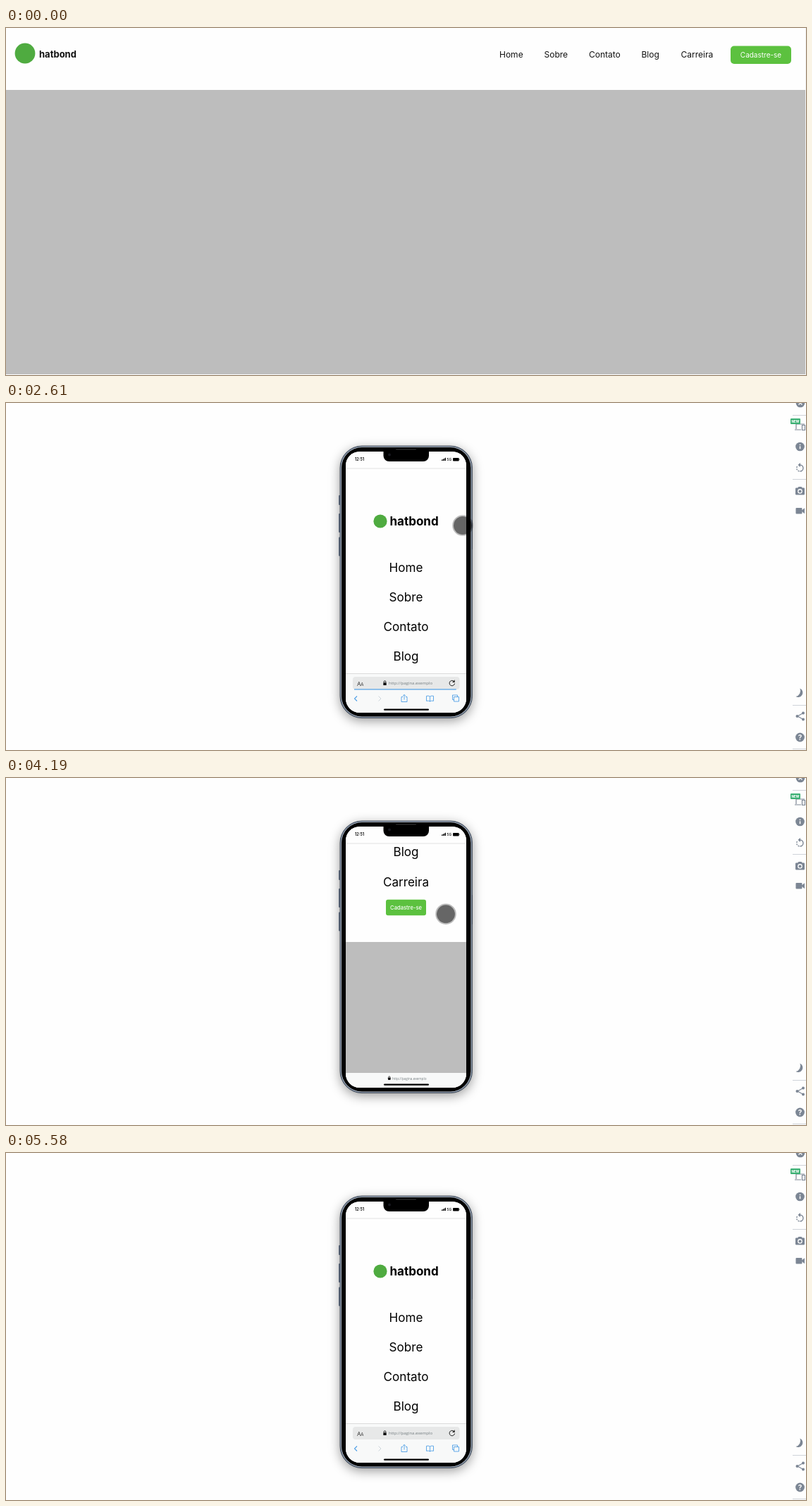
An HTML page with a canvas that plays this animation: 1135x493 px, repeating every 5930 ms.

```html
<!DOCTYPE html>
<html lang="pt">
<head>
<meta charset="utf-8">
<title>Menu responsivo</title>
<style>
  html, body { margin: 0; width: 100%; height: 100%; overflow: hidden; background: #fefefe; }
  canvas { display: block; }
</style>
</head>
<body>
<canvas id="stage" width="1135" height="493"></canvas>
<script>
const ctx = document.getElementById('stage').getContext('2d');
const LOOP = 5930;
const BRAND = 'hatbond';
const ADDRESS = 'http://pagina.exemplo';
const SANS = 'Inter, sans-serif';
const PAPER = '#fefefe', GREY = '#bdbdbd', GREEN = '#5cc13f', LOGO = '#4fab40';
const ICON = '#7c8694', BLUE = '#4f9fe6';

// Bursts of movement: first step, last step, number of steps.
const BURSTS = [
  [1940, 2520, 9], [2610, 3030, 6], [3180, 3760, 9], [3830, 3980, 3],
  [4190, 4410, 4], [4630, 5140, 8], [5300, 5580, 5]
];

// Motion keys: time, value.
const FADE = [[1940, .5], [2010, .87], [2085, 1]];
const TOP_BAR = [[1940, 6], [2230, 6], [2450, 0]];
const PROGRESS = [[1940, 60], [2010, 105], [2520, 138], [2680, 150]];
const SCROLL = [[3310, 0], [3540, 42], [3760, 122], [3830, 166], [3905, 200], [3980, 219],
  [4120, 219], [4190, 255], [4410, 377], [4640, 377], [4850, 215], [5067, 30], [5140, 0]];
const COLLAPSE = [[3310, 0], [3540, 1], [4780, 1], [4995, 0]];
const POINTER_X = [[2610, 648], [3030, 614], [3240, 614], [3760, 623], [4410, 624.5], [5230, 624.5], [5300, 632], [5372, 646]];
const POINTER_Y = [[2610, 174], [3030, 178], [3240, 178], [3760, 193], [4410, 193.5], [5230, 193.5], [5300, 188], [5372, 176]];

function snap(t) {
  const burst = BURSTS.filter(b => b[0] <= t).pop();
  if (!burst) return t;
  const [start, end, count] = burst;
  const gap = (end - start) / (count - 1);
  return start + gap * Math.min(count - 1, Math.floor((t - start) / gap + .1));
}

function at(keys, t) {
  if (t <= keys[0][0]) return keys[0][1];
  for (let i = 1; i < keys.length; i++) {
    const [t0, v0] = keys[i - 1], [t1, v1] = keys[i];
    if (t < t1) return v0 + (v1 - v0) * (t - t0) / (t1 - t0);
  }
  return keys[keys.length - 1][1];
}

function rect(x, y, w, h, color) {
  ctx.fillStyle = color;
  ctx.fillRect(x, y, w, h);
}

function round(x, y, w, h, r, color) {
  ctx.fillStyle = color;
  ctx.beginPath();
  ctx.roundRect(x, y, w, h, r);
  ctx.fill();
}

function disc(x, y, r, color) {
  ctx.fillStyle = color;
  ctx.beginPath();
  ctx.arc(x, y, r, 0, Math.PI * 2);
  ctx.fill();
}

function text(str, x, y, font, color, align = 'left') {
  ctx.font = font;
  ctx.fillStyle = color;
  ctx.textAlign = align;
  ctx.fillText(str, x, y);
}

function line(d, color, width = 1) {
  ctx.strokeStyle = color;
  ctx.lineWidth = width;
  ctx.stroke(new Path2D(d));
}

function shape(d, color) {
  ctx.fillStyle = color;
  ctx.fill(new Path2D(d), 'evenodd');
}

function place(x, y, draw, scale = 1) {
  ctx.save();
  ctx.translate(x, y);
  ctx.scale(scale, scale);
  draw();
  ctx.restore();
}

function drawDesktop() {
  rect(0, 88, 1134, 404, GREY);
  rect(1134, 0, 1, 493, '#f1f1f1');
  disc(27, 36, 14.4, LOGO);
  text(BRAND, 47, 42, '700 13px ' + SANS, '#111');
  [['Home', 700], ['Sobre', 763.5], ['Contato', 827], ['Blog', 901.5], ['Carreira', 957.5]]
    .forEach(([label, x]) => text(label, x, 42.3, '12px ' + SANS, '#111'));
  round(1028, 25.5, 86, 25.5, 5, GREEN);
  text('Cadastre-se', 1071, 41.5, '10px ' + SANS, '#fff', 'center');
}

function drawTools() {
  [17, 108, 429, 491].forEach(y => rect(1116, y, 19, 1, '#cfd3d9'));

  disc(1127, 0, 6.3, ICON);
  line('M1124.5-2.5l5 5M1129.5-2.5l-5 5', PAPER, 1.3);

  line('M1121 37v-7h12M1119 38h9M1129.5 31.500h4v7h-4z', ICON, 1.2);
  round(1113, 22, 14, 8, 1, '#3bb073');
  text('NEW', 1120, 27.8, '800 4.5px ' + SANS, '#fff', 'center');

  disc(1126.500, 62, 6.3, ICON);
  rect(1125.8, 61.3, 1.5, 4, PAPER);
  rect(1125.8, 58.6, 1.5, 1.5, PAPER);

  place(1126.500, 92.500, () => {
    line('M0-4.500A4.500 4.500 0 0 1 0 4.500', ICON, 1.4);
    ctx.setLineDash([2, 1.3]);
    line('M-1 4.500A4.500 4.500 0 0 1-3.500-3', ICON, 1.4);
    ctx.setLineDash([]);
    shape('M.5-7.500v6l-3.500-3z', ICON);
  });

  place(1126.500, 125, () => {
    shape('M-2-6h4l1.300 1.500h2q1.200 0 1.200 1.200v7.500q0 1.200-1.200 1.200h-10.600q-1.200 0-1.200-1.200v-7.500q0-1.200 1.200-1.200h2z', ICON);
    disc(0, .4, 3.3, PAPER);
    disc(0, .4, 2, ICON);
  });

  round(1120.5, 149, 9, 8.500, 1, ICON);
  shape('M1129 152.500l4-3.200v8l-4-3.200z', ICON);

  shape('M1126.500 405.500a6.500 6.500 0 1 1-6 11.500a8.500 8.500 0 0 0 6-11.500z', ICON);

  line('M1131 440.500l-8 4.500l8 4.500', ICON, 1.2);
  [[1131, 440.5], [1122.5, 445], [1131, 449.5]].forEach(([x, y]) => disc(x, y, 2, ICON));

  disc(1126.500, 475, 6.4, ICON);
  text('?', 1126.500, 478.7, '700 10px ' + SANS, PAPER, 'center');
}

function drawBody() {
  [[131, 14], [157, 27], [190.5, 27]].forEach(([y, h]) => round(472, y, 3, h, 1, '#74839a'));
  round(660, 166, 2, 42, 1, '#555d69');

  ctx.save();
  ctx.shadowColor = 'rgba(0,0,0,.4)';
  ctx.shadowBlur = 16;
  ctx.shadowOffsetY = 4;
  round(474, 61, 187.5, 386.5, 31, '#66758a');
  ctx.restore();
  ctx.strokeStyle = '#2e3846';
  ctx.lineWidth = .7;
  ctx.stroke();
  round(475.3, 62.300, 185, 384, 30, '#c3cbd6');
  round(476, 63, 183.500, 382.500, 29, '#000');
}

function drawPage(scroll) {
  ctx.save();
  ctx.translate(0, -scroll);
  disc(531, 168, 9.6, LOGO);
  text(BRAND, 544.5, 174.3, '700 17px ' + SANS, '#000');
  ['Home', 'Sobre', 'Contato', 'Blog', 'Carreira'].forEach((label, i) =>
    text(label, 567.5, 239.8 + i * 42.2, '17.1px ' + SANS, '#000', 'center'));
  round(539, 427.7, 57, 22.500, 3, GREEN);
  text('Cadastre-se', 567.5, 441.8, '500 7.6px ' + SANS, '#fff', 'center');
  rect(482, 488, 171, 500, GREY);
  ctx.restore();
}

function drawLock(x, y, s) {
  place(x, y, () => {
    round(-2, -.7, 4, 3.5, .5, '#111');
    line('M-1.200-.5v-1.300a1.200 1.200 0 0 1 2.400 0v1.300', '#111', .8);
  }, s);
}

function drawBrowser(collapse, progress) {
  const top = 384 + 35 * collapse;
  rect(482, top, 171, 60, '#f8f9f9');
  if (collapse < 1) rect(482, top, 171, 1, '#dcdcdc');

  ctx.save();
  ctx.translate(0, top - 384);
  ctx.globalAlpha = 1 - collapse;
  round(492, 389, 151.500, 18, 4, '#e7e8e8');
  text('A', 498, 402, '8px ' + SANS, '#333');
  text('A', 503.3, 402, '6px ' + SANS, '#333');
  line('M635.500 395.500a3.700 3.700 0 1 0 1 3', '#222', 1);
  shape('M636.700 393.300v3.700h-3.700z', '#222');
  if (progress) rect(494, 406.3, progress, 1.200, BLUE);

  line('M498 416.500l-3.500 3.500l3.500 3.500', BLUE, 1.1);
  line('M528.500 416.500l3.500 3.500l-3.500 3.500', '#cdd3da', 1);
  line('M563 417.500h-2v7h8v-7h-2M565 421.500v-7M563 416.300l2-2l2 2', BLUE, .9);
  line('M601.500 417v7q-2-1.500-5-.7v-7q3-.8 5 .7q2-1.500 5-.7v7q-3-.8-5 .7', BLUE, .9);
  line('M635.500 417.500h7v6.500h-7zM635.500 421.500h-2v-6.500h7v2.500', BLUE, .9);
  ctx.restore();

  const size = 6 - 1.3 * collapse;
  drawLock(537.5 + 6.3 * collapse, 398 + 28.5 * collapse, 1.1 - .2 * collapse);
  text(ADDRESS, 543 + 5 * collapse, 400.2 + 28.3 * collapse, size + 'px "Open Sans", sans-serif', '#747d80');
  round(536, 434.4, 64, 2.400, 1.2, '#000');
}

function drawStatus() {
  rect(482, 69, 171, 24, PAPER);
  rect(482, 92.500, 171, 1, '#e3e3e3');
  text('12:51', 495, 81.800, '600 5.5px ' + SANS, '#000');
  [1.5, 2.3, 3.2, 4.2].forEach((h, i) => rect(618 + i * 1.6, 82 - h, 1.2, h, '#000'));
  text('5G', 625.5, 82, '500 5px ' + SANS, '#000');
  round(634, 78, 8.7, 4.600, 1, '#000');
  rect(643, 79.500, .7, 1.500, '#777');
}

function drawPhone(t) {
  const progress = t < 2740 ? at(PROGRESS, t) : 0;
  drawBody();
  ctx.save();
  ctx.beginPath();
  ctx.roundRect(482, 69, 171, 371, 20);
  ctx.clip();
  rect(482, 69, 171, 371, PAPER);
  drawPage(at(SCROLL, t));
  drawBrowser(at(COLLAPSE, t), progress);
  drawStatus();
  ctx.restore();

  round(535.5, 66, 64.5, 17, [0, 0, 8, 8], '#000');
  round(553, 65, 29, 1.5, .7, '#292929');
  disc(544, 73.500, 2, '#17181f');

  const fade = at(FADE, t);
  if (fade < 1) rect(450, 45, 235, 425, `rgba(254,254,254,${1 - fade})`);
}

function drawPointer(t) {
  if (t < 2610 || t > 5400) return;
  const x = at(POINTER_X, t), y = at(POINTER_Y, t);
  disc(x, y, 13, 'rgba(0,0,0,.6)');
  ctx.strokeStyle = 'rgba(0,0,0,.26)';
  ctx.lineWidth = 1.8;
  ctx.beginPath();
  ctx.arc(x, y, 13.9, 0, Math.PI * 2);
  ctx.stroke();
}

function draw(now) {
  const t = snap(now % LOOP);
  rect(0, 0, 1135, 493, PAPER);
  if (t < 1570) drawDesktop();
  if (t >= 1790) drawTools();
  if (t >= 1940) {
    drawPhone(t);
    rect(944, 0, 190, at(TOP_BAR, t), '#231f20');
    drawPointer(t);
  }
}

const began = performance.now();
function tick() {
  draw(performance.now() - began);
  requestAnimationFrame(tick);
}
tick();
</script>
</body>
</html>
```
